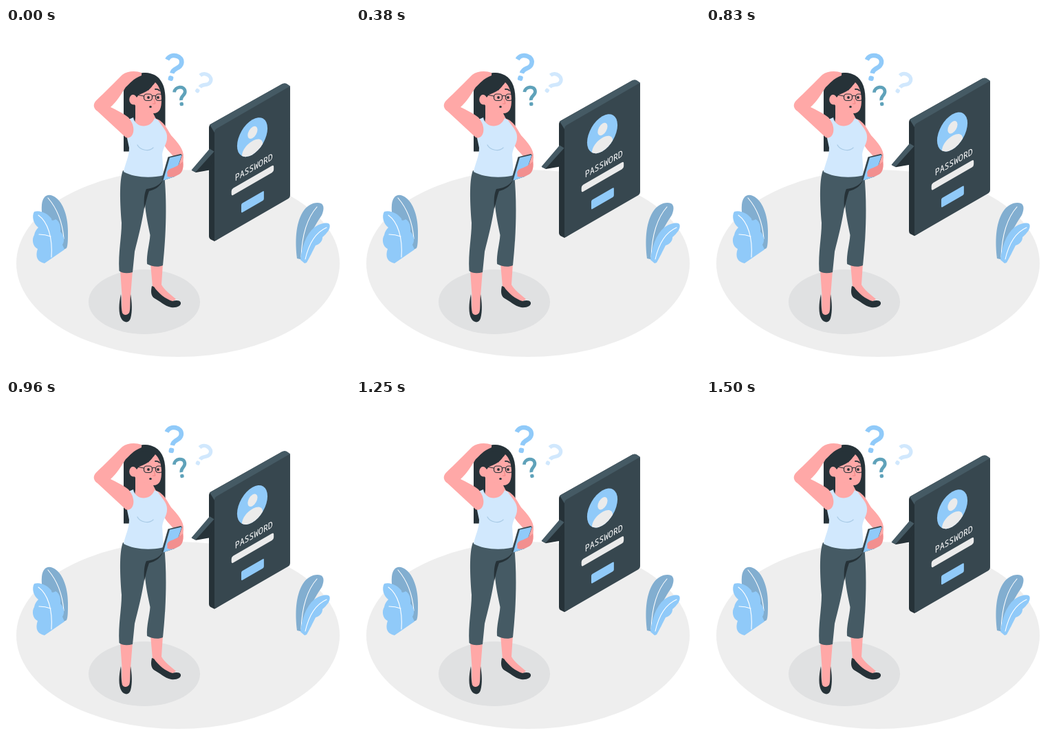
Write an HTML page that moves like this. It is 500 by 500 pixels and loops after 1540 ms.

```html
<!DOCTYPE html>
<html lang="en">
<head>
<meta charset="utf-8">
<title>Forgotten password</title>
<style>
html, body { margin: 0; width: 100%; height: 100%; overflow: hidden; background: #fff; }
svg { display: block; width: 100%; height: 100%; }
.skin { fill: #ffa8a7; }
.shade { fill: #f28f8f; }
.dark { fill: #263238; }
.slate { fill: #37474f; }
.pants { fill: #455a64; }
.blue { fill: #90caf9; }
.leaf { fill: #82aed0; }
.pale { fill: #ebebeb; }
.line { fill: none; stroke: #263238; stroke-linecap: round; stroke-linejoin: round; }
.vein { fill: none; stroke: #fff; stroke-width: 1.1; stroke-linecap: round; }
.fold { fill: none; stroke: #a9cbe6; stroke-width: 1.2; stroke-linecap: round; }
.label { font: 500 13.2px "Noto Sans Mono", monospace; fill: #fff; }
</style>
</head>
<body>
<svg viewBox="0 0 500 500">
  <defs>
    <clipPath id="disc"><circle cx="63.5" cy="-119.500" r="25.5"/></clipPath>
    <g id="mark">
      <path d="M-11.5 -8.5C-9 -20 10 -20 10 -8C10 .5 0 0 0 9" fill="none" stroke="currentColor" stroke-width="6.6"/>
      <rect x="-3.7" y="13" width="7.4" height="7.2" rx="2.6" fill="currentColor"/>
    </g>
  </defs>

  <ellipse cx="250" cy="342" rx="235" ry="136" fill="#eee"/>
  <ellipse cx="201" cy="398" rx="81" ry="47" fill="#e0e1e2"/>

  <g id="plants">
    <path class="leaf" d="M82 323C62 300 50 280 52 257C53 245 60 240 68 244C82 250 90 272 90 295C90 308 90 316 88 320Z"/>
    <path class="vein" d="M61 247C74 262 82 282 84 306"/>
    <path class="blue" d="M56 342C46 340 42 333 46 321C39 318 37 307 41 301C42 296 44 293 47 290C40 285 37 274 41 267C50 264 61 270 66 277C66 281 69 280 72 278C78 281 80 289 79 296C84 301 86 309 82 315L85 322Z"/>
    <path class="vein" d="M47 272C61 282 68 305 66 333M48 300Q57 300 65 303"/>
    <path class="leaf" d="M423 335C420 310 421 285 431 268C438 256 450 252 458 255C463 258 462 265 459 272C453 281 447 290 444 300L432 337Z"/>
    <path class="vein" d="M452 260C437 277 430 304 429 333"/>
    <path class="blue" d="M434 342L428 337C430 318 436 300 448 290C456 284 466 282 470 285C473 291 466 299 460 304C460 310 456 314 450 316C446 324 441 334 437 341Z"/>
    <path class="vein" d="M466 290C450 297 440 314 435 336"/>
  </g>

  <g id="panel">
    <path class="dark" d="M295 145Q295 141 298 139.5L402 81L380 262L303 310L297 307Q295 305.500 295 303Z"/>
    <path class="pants" d="M296 140.700L402 81Q405 79.500 408 81L413 84.500V90L303 152Z"/>
    <g transform="matrix(.866 -.5 0 1 303 310)">
      <rect class="slate" y="-162" width="127" height="162" rx="3"/>
      <circle class="blue" cx="63.5" cy="-119.500" r="25.5"/>
      <g class="pale" clip-path="url(#disc)">
        <circle cx="64" cy="-126" r="8.200"/>
        <path d="M46 -92V-101C47 -118 80 -118 81 -101V-92Z"/>
      </g>
      <text class="label" x="34.4" y="-70">PASSWORD</text>
      <rect class="pale" x="28.5" y="-61.5" width="71" height="10" rx="3"/>
      <rect class="blue" x="45" y="-32" width="38" height="13.5" rx="2"/>
    </g>
    <path class="dark" d="M270 207L297 176L302.500 180L296 206.500L276 210Z"/>
    <path class="pants" d="M269.500 206.500L296 175.500L302.500 179.500L275.500 209.500Z"/>
  </g>

  <g id="woman">
    <path class="dark" d="M171 179.500V92C172 74 185 65 203 65C222 66 231.500 80 231.500 102V158L180 179.500Z"/>
    <path class="skin" d="M166 352H184L181 390L180 418H168L168.500 388Z"/>
    <path class="skin" d="M210 342H228L226 373C230 381 240 388 247 394L240 399L216 389L213 376Z"/>
    <path class="dark" d="M167 387C164 400 163 415 168 423C172 429 179 429 181 422C184 412 183 398 181 387C180 400 181 410 179 414C176 418 171 418 169 414C167 405 168 395 167 387Z"/>
    <path class="dark" d="M212 375C210 384 211 390 216 393C224 397 230 404 240 406C248 407 255 404 254 399C252 395 246 396 242 397C232 394 222 386 215 376Z"/>
    <path class="pants" d="M170 207C185 215 212 217 230 213C234 250 233 300 228 345C222 348 212 347 205 343C204 328 209 312 209.500 301C207 288 203 272 202 255C198 282 192 305 187 325L184 355C177 357 169 357 164.500 353C163 325 168 305 168 283C166 258 164 222 170 207Z"/>
    <path class="dark" d="M201 263C200 250 201 240 204 234C213 233 222 230 228 221C224 232 215 235 208 237C205 245 203 255 201 263Z"/>
    <path class="skin" d="M188 108V131L186 146H214L218 132L212 120Z"/>
    <path class="skin" d="M215 131C228 133 234 146 240 156C250 167 259 177 258 188C257 196 259 202 255 208C250 214 240 218 233 216L244 203L246 190C242 184 232 176 229 168C233 160 228 150 221 142Z"/>
    <path fill="#d1e8fd" d="M178 133L185 130C188 146 210 147 216 131L221 134C228 145 235 150 234 160C234 168 228 174 227 184L229 214C210 219 185 217 171 209C173 197 179 188 179 174L176 160Z"/>
    <path class="fold" d="M191 170C195 178 208 180 214 174"/>
    <path class="skin" d="M188 98C198 94 211 88 217 79C223 84 226 95 226 104C226 116 224 124 214 124C207 124 199 121 194 115L187 112Z"/>
    <ellipse class="skin" cx="185.500" cy="104" rx="6.300" ry="7.500"/>
    <path class="dark" d="M181 97C185 79 199 68 215 78C213 89 202 94 193 97L190 101C188 97 185 96 181 97Z"/>
    <path class="skin" d="M197 65C188 61.500 176 62.500 169 68C158 79 144 93 130.500 106C126 111 127 117 133 121L174 159C181 162 187 154 185 144C184 138 181 134 178 130C169 123 160 119 152 115C162 106 168 95 174 86C181 80 184 74 197 69Z"/>
    <g class="line" stroke-width="1.200">
      <rect x="200.500" y="96" width="12" height="9.500" rx="4"/>
      <rect x="217.500" y="96" width="10" height="9.500" rx="4"/>
      <path d="M212.500 99Q215 97.500 217.500 99M200.500 99L190 97"/>
      <path stroke-width="1.800" d="M199 92Q203 88.500 207 89.500M217 89Q221 88.500 223 91"/>
    </g>
    <circle class="dark" cx="207" cy="101" r="1.900"/>
    <circle class="dark" cx="221" cy="101" r="1.900"/>
    <path d="M215 103L217 110H213" fill="none" stroke="#ee8583"/>
    <ellipse class="dark" cx="210" cy="114.500" rx="1.800" ry="1.600"/>
    <path class="slate" d="M235.500 187.500L254 183L256 184.500L245 216L228.500 221.500L226 220Z"/>
    <path class="blue" d="M238 188.500L255.500 184.500L245 216L228.500 221.500Z"/>
    <path class="shade" d="M235 208C238 203 247 204 257 194C259 206 255 212 249 214C244 217 237 218 234 215C236 213 233 211 235 208Z"/>
  </g>

  <g id="marks">
    <use href="#mark" color="#90caf9"/>
    <use href="#mark" color="#5fa2ba"/>
    <use href="#mark" color="#d1e8fd"/>
  </g>
</svg>
<script>
const LOOP = 1540, PEAK = 715, LIFT = 8.2, SWAY = 3;
const panel = document.getElementById('panel');
const marks = [...document.getElementById('marks').children];
// x, y, scale, tilt of each question mark
const poses = [[243.4, 57, 1, 13], [253.7, 98.5, .73, -8], [286, 80, .82, 34]];

function draw(now) {
  const turn = 2 * Math.PI / LOOP, t = now % LOOP;
  const rise = LIFT * (1 + Math.cos((t - PEAK) * turn)) / 2;
  panel.setAttribute('transform', `translate(0 ${-rise})`);
  const sway = SWAY * Math.sin((t + 60) * turn);
  poses.forEach(([x, y, s, tilt], i) =>
    marks[i].setAttribute('transform', `translate(${x} ${y}) rotate(${tilt + sway}) scale(${s})`));
}

const start = performance.now();
function tick() {
  draw(performance.now() - start);
  requestAnimationFrame(tick);
}
tick();
</script>
</body>
</html>
```
